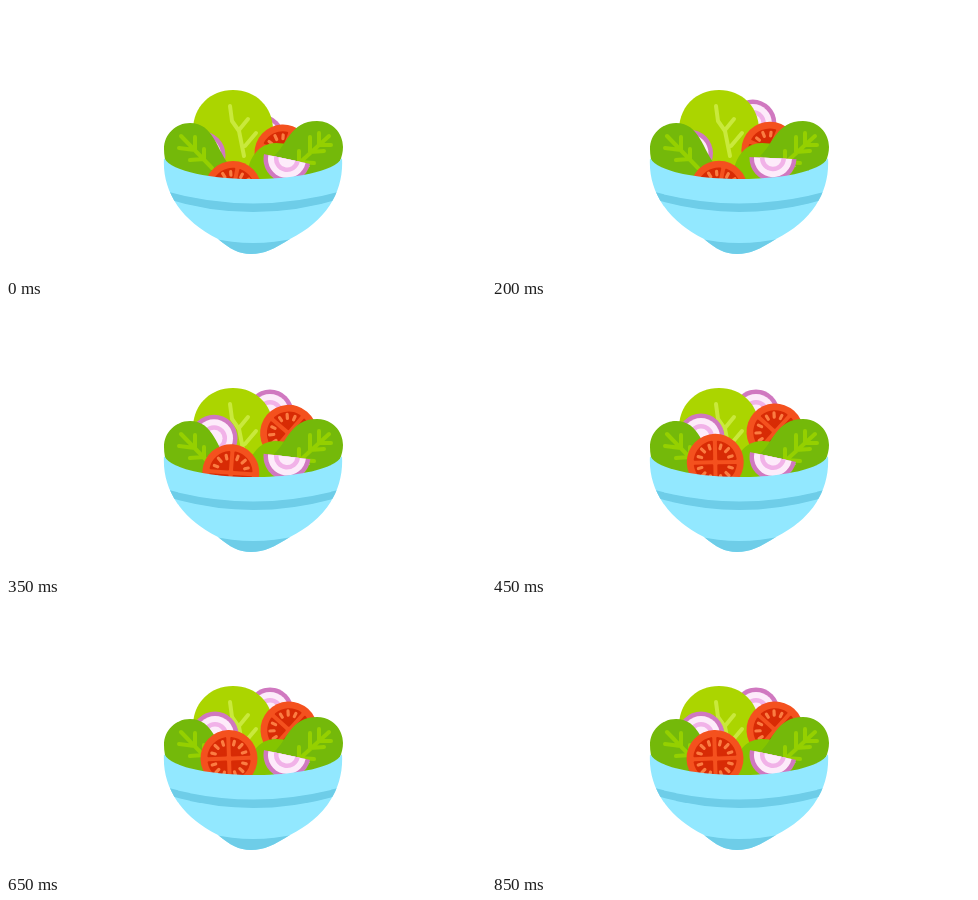
Recreate the animation shown at these times as an HTML page. Size 480 by 270 pixels, loop 900 ms.

```html
<!DOCTYPE html>
<html>
<head>
<meta charset="utf-8">
<title>Salad bowl</title>
<style>
  html, body { margin: 0; width: 100%; height: 100%; overflow: hidden; background: #fff; }
  svg { display: block; width: 480px; height: 270px; }
  .vein { fill: none; stroke: #95d000; stroke-width: 4; stroke-linecap: round; stroke-linejoin: round; }
</style>
</head>
<body>
<svg viewBox="0 0 480 270">
  <defs>
    <g id="onion">
      <circle r="23.5" fill="#d078c0"/>
      <circle r="19" fill="#fdebfa"/>
      <circle r="13" fill="#f1b2e8"/>
      <circle r="8.5" fill="#fdebfa"/>
    </g>
    <g id="chamber">
      <path d="M3 3H20.5A20.7 20.7 0 0 1 3 20.5Z" fill="#d82b05" stroke="#d82b05" stroke-width="2" stroke-linejoin="round"/>
      <path d="M13.5 5L17 6M10.5 10.5L13.5 13.5M5 13.5L6 17" stroke="#fb7d42" stroke-width="3.2" stroke-linecap="round"/>
    </g>
    <g id="tomato">
      <circle r="28.5" fill="#f4511e"/>
      <use href="#chamber"/>
      <use href="#chamber" transform="rotate(90)"/>
      <use href="#chamber" transform="rotate(180)"/>
      <use href="#chamber" transform="rotate(270)"/>
    </g>
    <clipPath id="half"><path d="M-30 0H30V30H-30Z"/></clipPath>
    <clipPath id="bowl">
      <path d="M158 152C174 180 320 180 336 152C338 184 322 214 284 233C268 243 258 248 245 248C233 248 224 243 212 233C174 214 156 184 158 152Z"/>
    </clipPath>
  </defs>

  <use id="backOnion" href="#onion"/>
  <path d="M227 84C250 84 267 101 267 124V165H206C194 150 187 139 187 124C187 101 204 84 227 84Z" fill="#abd500"/>
  <path class="vein" style="stroke:#c9e93c" d="M224 100L226 115L233 125L238 150M242 113L233 124M250 127L239 140"/>
  <use id="backTomato" href="#tomato"/>
  <use id="leftOnion" href="#onion"/>

  <path d="M158 143C158 128 170 117 184 117C208 117 211 145 224 160V176H172C162 165 158 155 158 143Z" fill="#74b90a"/>
  <path class="vein" d="M175 130L206 162M189 131V144L173 142M198 143V153L184 154"/>

  <path d="M240 176C241 153 252 137 270 137C290 137 306 150 306 176Z" fill="#84c500"/>
  <path d="M268 150C281 139 284 115 311 115C326 115 337 127 337 141C337 151 332 160 325 174H296L304 160Z" fill="#74b90a"/>
  <path class="vein" d="M290 160L323 130M304 131V146L318 145M313 127V139L325 139M293 145V156L308 157"/>

  <g id="frontOnion"><use href="#onion" clip-path="url(#half)"/></g>
  <use id="frontTomato" href="#tomato"/>

  <g clip-path="url(#bowl)">
    <path d="M150 140H345V255H150Z" fill="#92e8ff"/>
    <path d="M155 184Q247 211 340 184V191Q247 221 155 191Z" fill="#6ecde8"/>
    <path d="M205 232Q247 242 290 232V255H205Z" fill="#6ecde8"/>
  </g>
</svg>
<script>
  const LOOP = 900, STEP = 50;

  const ease = (t, start, end) => {
    const p = Math.min(1, Math.max(0, (t - start) / (end - start)));
    return p * p * (3 - 2 * p);
  };

  // id, start ms, end ms, [x, y, angle] before and after
  const risers = [
    ["backOnion", 50, 300, [255, 132, 0], [264, 109, 0]],
    ["backTomato", 140, 390, [277, 147, 20], [283, 128, 42]],
    ["leftOnion", 150, 390, [196, 149, 0], [209, 133, 0]],
    ["frontTomato", 180, 500, [227, 183.5, 12], [223, 156.5, -2]]
  ];

  const place = (id, x, y, angle) =>
    document.getElementById(id).setAttribute("transform", `translate(${x} ${y}) rotate(${angle})`);

  function draw(now) {
    const t = Math.floor(now % LOOP / STEP) * STEP;
    for (const [id, start, end, from, to] of risers) {
      const p = ease(t, start, end);
      place(id, ...from.map((v, i) => v + (to[i] - v) * p));
    }
    const swing = t > 50 && t < 450 ? Math.sin(Math.PI * (t - 50) / 400) ** 2 : 0;
    place("frontOnion", 281, 153 - swing, 12 - 11 * swing);
    requestAnimationFrame(draw);
  }
  draw(performance.now());
</script>
</body>
</html>
```
